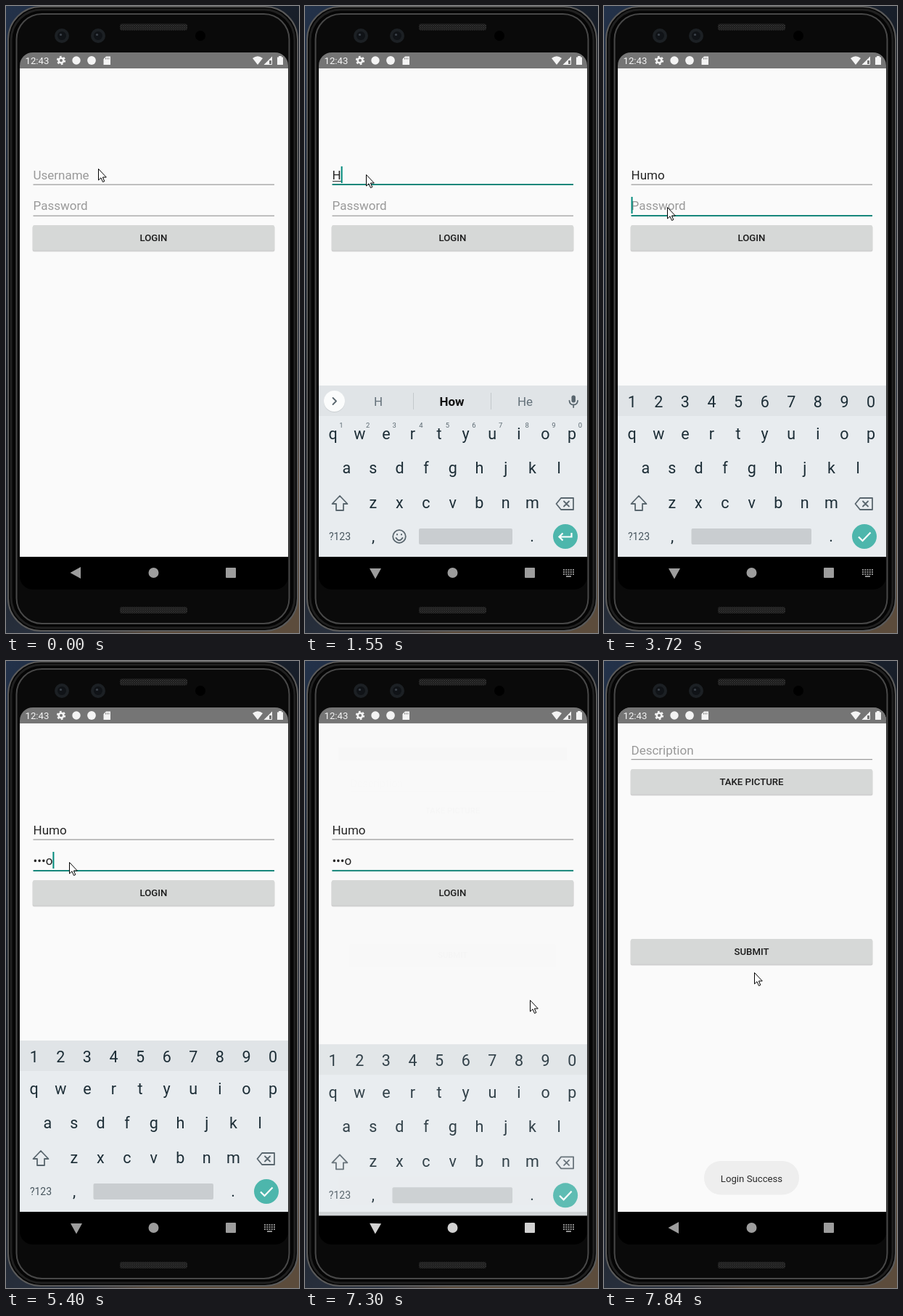
An HTML page that plays this animation: 404x864 px, repeating every 7990 ms.

```html
<!DOCTYPE html>
<html lang="en">
<head>
<meta charset="utf-8">
<title>Login demo</title>
<style>
  html, body { margin: 0; width: 100%; height: 100%; overflow: hidden; background: #000; }
  svg { display: block; width: 404px; height: 864px; font-family: Roboto, sans-serif; }
  text { white-space: pre; }
  .mid { text-anchor: middle; }
  .edit { font-size: 17px; fill: #222; }
  .hint { font-size: 17px; fill: #999; }
  .label { font-size: 13.2px; font-weight: 500; fill: #1b1b1b; text-anchor: middle; }
  .key { font-size: 21.5px; fill: #1c2d36; text-anchor: middle; }
  .sup { font-size: 9.5px; fill: #5c6a72; text-anchor: middle; }
  .word { font-size: 17px; fill: #64717a; text-anchor: middle; }
  .icon { fill: none; stroke: #59666e; stroke-width: 1.8; stroke-linejoin: round; stroke-linecap: round; }
</style>
</head>
<body>
<svg viewBox="0 0 404 864">
  <defs>
    <linearGradient id="desk" x2=".5" y2="1">
      <stop offset="0" stop-color="#23324a"/><stop offset=".5" stop-color="#151a22"/>
      <stop offset=".9" stop-color="#2c3442"/><stop offset="1" stop-color="#5c4c3c"/>
    </linearGradient>
    <pattern id="mesh" width="3" height="3" patternUnits="userSpaceOnUse">
      <rect width="3" height="3" fill="#171717"/><path d="M0 0L3 3M3 0L0 3" stroke="#343434" stroke-width=".8"/>
    </pattern>
    <clipPath id="screen"><rect x="19" y="64" width="370" height="740" rx="18"/></clipPath>
    <clipPath id="btn"><rect x="37" y="302" width="333" height="34.5" rx="2"/></clipPath>
    <g id="window">
      <rect x="19" y="64" width="370" height="22" fill="#757575"/>
      <rect x="19" y="86" width="370" height="673" fill="#fafafa"/>
      <rect x="19" y="759" width="370" height="45"/>
    </g>
    <g id="camera">
      <circle r="10" fill="#1c2024"/><circle r="6" fill="#101317"/><circle cx="-1.5" cy="-1.5" r="1.6" fill="#3c434b"/>
    </g>
  </defs>

  <!-- phone body -->
  <rect width="404" height="864" fill="url(#desk)"/>
  <g fill="#050505">
    <rect x="3" y="1" width="399" height="860" rx="45" stroke="#5a5a5a" stroke-width="2"/>
    <rect x="7" y="5" width="391" height="852" rx="42" stroke="#202020" stroke-width="3"/>
    <rect x="14.5" y="11" width="376" height="840" rx="35" stroke="#484848" stroke-width="2" fill="#0a0a0a"/>
  </g>
  <rect x="157" y="24.5" width="93" height="9" rx="3" fill="url(#mesh)"/>
  <rect x="157" y="828" width="93" height="9" rx="3" fill="url(#mesh)"/>
  <use href="#camera" x="77" y="41"/>
  <use href="#camera" x="127" y="41"/>
  <circle cx="268" cy="41" r="7"/>

  <g clip-path="url(#screen)">
    <g id="login">
      <use href="#window"/>
      <rect id="line0" x="37.5" width="332.5"/>
      <rect id="line1" x="37.5" width="332.5"/>
      <text id="user" x="37.5" y="239"/>
      <text id="pass" x="37.5" y="281"/>
      <rect id="compose" x="38" y="241" height="1" fill="#333"/>
      <rect id="caret" width="2" height="23" fill="#00897b"/>
      <g id="loginBtn"></g>
      <circle id="ripple" cx="213" cy="320" clip-path="url(#btn)"/>
      <rect id="dim" x="19" y="64" width="370" height="740"/>
    </g>

    <g id="main">
      <use href="#window"/>
      <text class="hint" x="37.5" y="128.5">Description</text>
      <rect x="37.5" y="135.2" width="332.5" height="1" fill="#858585"/>
      <g id="mainBtns"></g>
    </g>

    <g id="keyboard">
      <rect x="19" y="523" width="370" height="236" fill="#e8ecef"/>
      <rect x="19" y="523" width="370" height="42" fill="#e0e4e7"/>
      <g id="letters"></g>
      <g id="sups"></g>
      <g id="digits"></g>
      <text x="48" y="736" class="mid" font-size="14" fill="#48565e">?123</text>
      <text x="94" y="738" class="key">,</text>
      <text x="313" y="738" class="key">.</text>
      <rect id="space" y="720" height="22" rx="2" fill="#c9cdd0"/>
      <g class="icon">
        <path d="M48 675L58.5 686H53V695H43V686H37.5Z"/>
        <path d="M353 678H370V694H353L346.5 686ZM357 682.5L364 689.5M364 682.5L357 689.5"/>
        <g id="emoji">
          <circle cx="130" cy="731" r="8.8"/>
          <path d="M125.5 733Q130 739.5 134.5 733M127 728v.4M133 728v.4" stroke-width="2"/>
        </g>
      </g>
      <circle cx="359" cy="731" r="17" fill="#4db6ac"/>
      <g fill="none" stroke="#fff" stroke-width="2.2">
        <path id="enter" d="M367.5 726V731.5H351M355.5 726.5L350.5 731.5L355.5 736.5"/>
        <path id="check" d="M351 731.5L356.5 737L367.5 725.5"/>
      </g>
      <g id="bar">
        <circle cx="40.5" cy="545.5" r="14.5" fill="#b5babd" opacity=".5"/>
        <circle cx="40.5" cy="544.5" r="14.5" fill="#fbfcfc"/>
        <path id="chevron" class="icon" d="M42.5 540L38 544.5L42.5 549"/>
        <rect x="367.5" y="536.5" width="5.5" height="10" rx="2.7" fill="#59666e"/>
        <path class="icon" d="M364.5 544Q365 549.5 370.2 549.5Q375.5 549.5 376 544M370.2 550V553"/>
      </g>
      <g id="tools">
        <g class="icon">
          <circle cx="88" cy="542.5" r="5"/><path d="M92 546.5L97 551.5"/>
          <path d="M138.5 537H150.5V546.5L145.5 551.5H136.5V539Q136.5 537 138.5 537ZM140 545Q143.5 549.5 147 545M140.5 541v.3M146.5 541v.3"/>
          <path d="M284.5 534V555" stroke="#c5cacd" stroke-width="1"/>
          <path d="M312 544.5h.1M318 544.5h.1M324 544.5h.1" stroke-width="4"/>
        </g>
        <text x="197" y="549" class="mid" font-size="13.5" font-weight="900" fill="#59666e">GIF</text>
        <rect x="244" y="537" width="15" height="15" rx="1" fill="#6b777e"/>
      </g>
      <g id="words">
        <text id="word0" class="word" x="101" y="551"/>
        <text id="word1" class="word" x="202.5" y="551" style="font-weight:700;fill:#111"/>
        <text id="word2" class="word" x="303.5" y="551"/>
        <path d="M149.5 533V556M256.5 533V556" stroke="#c3c8cb"/>
      </g>
    </g>

    <g id="toast">
      <rect x="138" y="689" width="131" height="46.5" rx="23" fill="#eee"/>
      <text x="203.5" y="718" class="mid" font-size="13.2" fill="#2b2b2b">Login Success</text>
    </g>

    <!-- system bars -->
    <g fill="#f4f4f4">
      <text x="26.5" y="80" font-size="13.2">12:43</text>
      <g fill="none" stroke="#f4f4f4">
        <circle cx="76" cy="75" r="3.3" stroke-width="2.6"/>
        <circle cx="76" cy="75" r="5.2" stroke-width="2" stroke-dasharray="2.7 2.745"/>
        <path d="M366.5 70V80.5H356.5"/>
      </g>
      <circle cx="97" cy="75" r="5.7"/>
      <circle cx="118" cy="75" r="5.9"/>
      <path d="M138 69.5H144V81H134.5V73Z"/>
      <path d="M137.5 71.5v2M139.7 71.5v2M141.9 71.5v2" stroke="#757575"/>
      <path d="M347 81L340 72Q347 66.5 354 72Z"/>
      <path d="M355.5 81L367 69.5V81ZM363 75V81H367V75Z" fill-rule="evenodd"/>
      <path d="M376 69H380V70.5H382V81H374V70.5H376Z"/>
    </g>
    <g id="nav">
      <path id="back" d="M88.5 781L103 773V789Z"/>
      <circle cx="203.5" cy="781" r="7"/>
      <rect x="303" y="774" width="14" height="14" rx="1"/>
      <g id="imeIcon" fill="none" stroke="#8c8c8c" stroke-width="1.8">
        <path d="M356 777H371M356 780H371M356 783H371" stroke-dasharray="2 1.25"/>
        <path d="M360 786H367"/>
      </g>
    </g>
  </g>
  <path id="cursor" d="M.5 .5V16L4 12.8L6.5 18.5L8.8 17.5L6.4 12H11.3Z" fill="#fff" stroke="#000"/>
</svg>
<script>
const LOOP = 7990;
const FOCUS_USER = 380, FOCUS_PASS = 3590, PRESS = 6490, OPEN_MAIN = 7300;
const NAME = "Humo";
const userKeys = [1550, 2270, 2520, 2670];
const passKeys = [4560, 5010, 5150, 5400];
const guesses = ["", "How", "Hum", "Humid", "Humor"];
const others = ["", "He", "Hub", "Hm", "Human"];
const blinkStarts = [20, ...userKeys, FOCUS_PASS, ...passKeys];
// Pointer moves: start, end, x, y
const moves = [
  [0, 0, 127, 224], [0, 240, 84, 232], [2860, 3090, 115, 250], [3090, 3400, 87, 277], [5850, 6090, 232, 337],
  [6250, 6490, 213, 322], [6640, 6790, 267, 364], [6790, 7180, 310, 467], [7450, 7840, 207, 429],
];

const $ = id => document.getElementById(id);
const set = (id, attrs) => { for (const k in attrs) $(id).setAttribute(k, attrs[k]); };
const show = (ids, opacity) => ids.split(" ").forEach(id => set(id, { opacity: +opacity }));
const ramp = (t, start, length) => Math.min(1, Math.max(0, (t - start) / (length || 1)));
const easeOut = x => 1 - (1 - x) ** 5;
const count = (times, t) => times.filter(k => k <= t).length;
const zoom = (s, dy = 0) => `translate(${204 * (1 - s)} ${434 * (1 - s) + dy}) scale(${s})`;

const button = (y, label) =>
  `<rect x="36.5" y="${y + 1}" width="334" height="35.5" rx="2.5" opacity=".17"/>
   <rect x="37" y="${y}" width="333" height="34.5" rx="2" fill="#d6d8d7"/>
   <text class="label" x="203.5" y="${y + 22}">${label}</text>`;
const row = (chars, x, y, cls = "key") =>
  [...chars].map((c, i) => `<text class="${cls}" x="${x + 36.6 * i}" y="${y}">${c}</text>`).join("");

$("loginBtn").innerHTML = button(302, "LOGIN");
$("mainBtns").innerHTML = button(149, "TAKE PICTURE") + button(383, "SUBMIT");
$("letters").innerHTML = row("qwertyuiop", 38.7, 596.5) + row("asdfghjkl", 57.3, 643.5) + row("zxcvbnm", 93.8, 691.5);
$("sups").innerHTML = row("1234567890", 50, 581, "sup");
$("digits").innerHTML = row("1234567890", 38.7, 553);

function field(id, value, hint) {
  $(id).textContent = value || hint;
  set(id, { class: value ? "edit" : "hint" });
  return value ? $(id).getComputedTextLength() : 0;
}

function drawForm(t) {
  const focus = t < FOCUS_USER ? -1 : t < FOCUS_PASS ? 0 : 1;
  const typed = count(userKeys, t), hidden = count(passKeys, t);
  const name = NAME.slice(0, typed);
  const secret = hidden ? "•".repeat(hidden - 1) + NAME[hidden - 1] : "";
  const widths = [field("user", name, "Username"), field("pass", secret, "Password")];
  [245, 288].forEach((y, i) => set("line" + i, focus === i
    ? { y, height: 2, fill: "#16877b" } : { y: y + .6, height: 1, fill: "#858585" }));
  set("compose", { width: focus === 0 ? widths[0] : 0 });

  const lastKey = blinkStarts.findLast(k => k <= t);
  const lit = focus >= 0 && (t - lastKey) % 1000 < 500;
  set("caret", { x: 37.5 + (widths[focus] || 0), y: focus === 1 ? 263 : 221, opacity: +lit });
  set("ripple", { r: Math.max(0, t - PRESS), opacity: .1 * (1 - ramp(t, 6950, 200)) });

  [name, guesses[typed], others[typed]].forEach((w, i) => $("word" + i).textContent = w);
  show("tools", !typed);
  set("chevron", { transform: typed ? "rotate(180 40.5 544.5)" : "" });
}

function drawKeyboard(t, grow) {
  const open = ramp(t, 430, 210) - ramp(t, 7270, 300);
  set("keyboard", { opacity: open, transform: zoom(grow, 50 * (1 - open)) });
  const numbers = t >= FOCUS_PASS + 100;
  show("bar sups emoji enter", !numbers);
  show("digits check", numbers);
  show("words", !numbers && t >= userKeys[0]);
  set("space", numbers ? { x: 120.5, width: 165.5 } : { x: 157, width: 129 });
}

function draw(t) {
  const opened = easeOut(ramp(t, OPEN_MAIN, 400));
  const grow = 1 + .05 * opened;
  drawForm(t);
  drawKeyboard(t, grow);
  set("login", { transform: zoom(grow) });
  set("main", { opacity: ramp(t, OPEN_MAIN, 80), transform: zoom(.85 + .15 * opened) });
  show("dim", .3 * opened);
  show("toast", ramp(t, 7380, 220));

  set("nav", { fill: opened > 0 && opened < 1 ? "#d2d2d2" : "#9d9d9d" });
  set("back", { transform: `rotate(${-90 * (ramp(t, 400, 200) - opened)} 97 781)` });
  show("imeIcon", t >= 430 && t < OPEN_MAIN + 100);

  let [x, y] = [0, 0];
  for (const [start, end, toX, toY] of moves) {
    const p = ramp(t, start, end - start);
    if (start <= t) [x, y] = end > start ? [x + (toX - x) * p, y + (toY - y) * p] : [toX, toY];
  }
  set("cursor", { transform: `translate(${Math.round(x)} ${Math.round(y)})` });
}

function frame() {
  draw(performance.now() % LOOP);
  requestAnimationFrame(frame);
}
frame();
</script>
</body>
</html>
```
